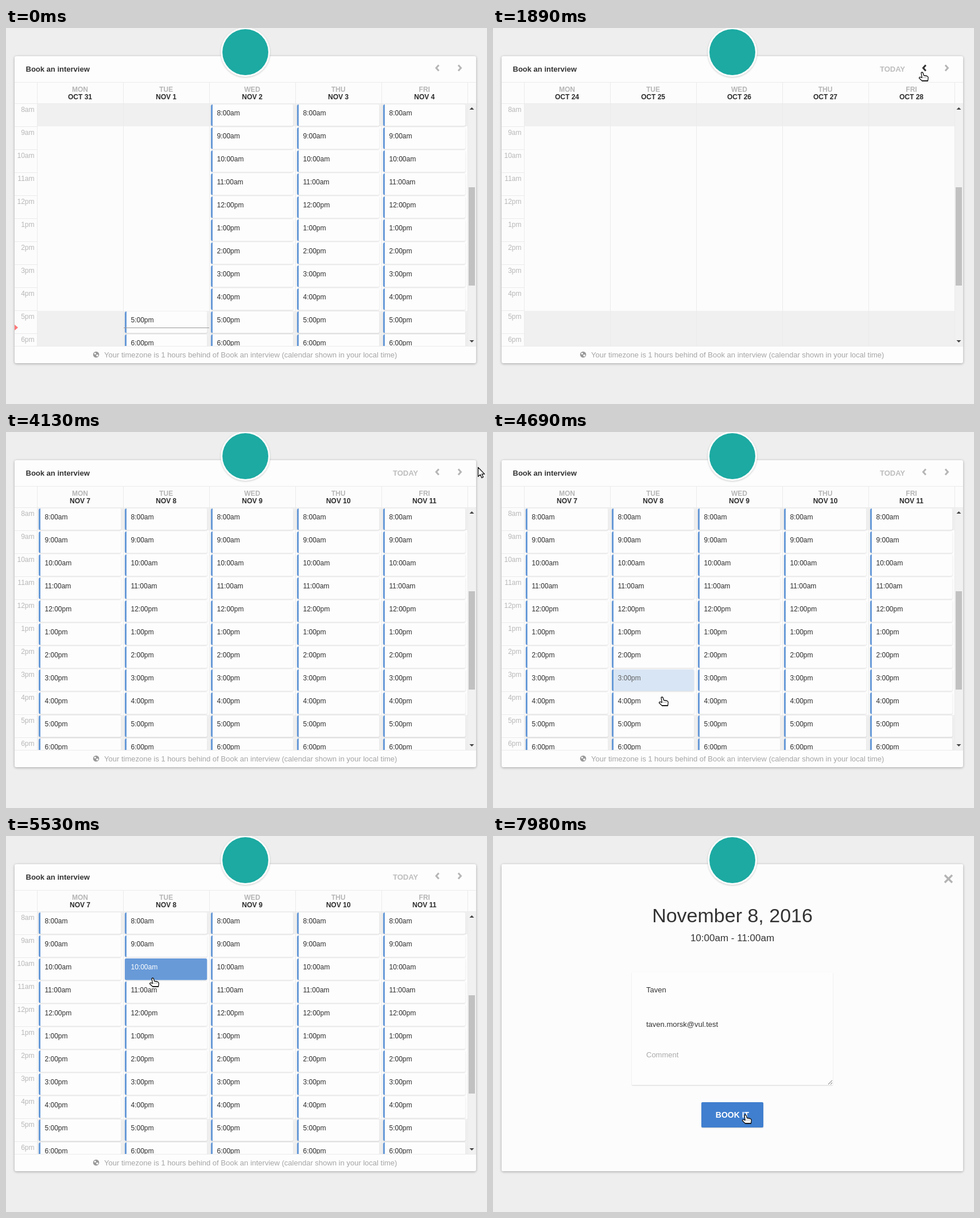
An HTML page with a canvas that plays this animation: 838x654 px, repeating every 8 s.

```html
<!DOCTYPE html>
<html lang="en">
<head>
<meta charset="utf-8">
<title>Book an interview</title>
<style>
  html, body { margin: 0; width: 100%; height: 100%; overflow: hidden; background: #eee; }
  canvas { display: block; }
</style>
</head>
<body>
<canvas id="stage" width="838" height="654"></canvas>
<script>
const ctx = document.getElementById('stage').getContext('2d');
const LOOP = 8000, STEP = 70;
const BACK_CLICK = 1890, NEXT_CLICK = 2870, SECOND_NEXT_CLICK = 3920, SLOT_CLICK = 5880;
const BLUE = '#689ad8', LINE = '#ebebeb', DARK = '#333', PALE = '#b5b5b5', PAPER = '#fcfcfc';
const DAYS = ['MON', 'TUE', 'WED', 'THU', 'FRI'];
const COLUMN = 150, ROW = 40, ROWS = 11, SLOT_WIDTH = 143.5;
const GUEST = { name: 'Taven', mail: 'taven.morsk@vul.test' };

const PREV = [736, 60, 21, 30], NEXT = [776, 60, 26, 30];
const FORM = [242, 237, 350, 196], BUTTON = [363, 463, 108, 44];

const ARROW = new Path2D('M0 0V16L3.8 12.6L6.4 18.2L9 17L6.5 11.6H11.3Z');
const HAND = new Path2D('M-1.5 1.5Q0 -.5 1.6 1.5L3 6L8.5 7Q11 8 10.6 11L10 15.5H0L-5 10.8Q-5.4 8.4 -2.6 9L-.2 10Z');

// Each pointer move swings along a curve bent towards `via`
const ENTRY = { start: 420, at: [620, 487] };
const MOVES = [
  { start: 420, end: 840, via: [860, 420], to: [827, 146] },
  { start: 840, end: 1190, via: [800, 70], to: [745, 70] },
  { start: 1190, end: 1470, via: [743, 84], to: [747, 76] },
  { start: 1960, end: 2590, via: [752, 66], to: [787, 69] },
  { start: 3920, end: 4690, via: [960, 0], to: [294, 460] },
  { start: 4690, end: 5250, via: [735, 560], to: [270, 232] },
  { start: 5250, end: 5530, via: [262, 236], to: [255, 246] },
  { start: 5530, end: 5670, via: [256, 236], to: [258, 228] },
  { start: 6440, end: 7070, via: [180, 480], to: [484, 470] },
  { start: 7140, end: 7630, via: [440, 364], to: [431, 490] },
  { start: 7910, end: 7980, via: [435, 487], to: [439, 484] }
];

const clamp = k => Math.min(1, Math.max(0, k));
const smooth = k => k * k * (3 - 2 * k);

function pointerAt(t) {
  if (t < ENTRY.start) return null;
  let at = ENTRY.at;
  for (const { start, end, via, to } of MOVES) {
    if (t < start) break;
    const k = smooth(clamp((t - start) / (end - start))), j = 1 - k;
    at = at.map((from, i) => j * j * from + 2 * j * k * via[i] + k * k * to[i]);
  }
  return at.map(Math.round);
}

const inside = (p, [x, y, w, h]) => p && p[0] >= x && p[0] < x + w && p[1] >= y && p[1] < y + h;
const hasSlot = (week, day, row) => week === 2 || week === 1 && (day > 1 || day === 1 && row > 8);

function weekAt(t) {
  if (t < BACK_CLICK) return 1;
  if (t < NEXT_CLICK) return 0;
  return t < SECOND_NEXT_CLICK ? 1 : 2;
}

function slotAt(t) {
  const p = pointerAt(t);
  if (t >= SLOT_CLICK || !inside(p, [57, 133, 744, 420])) return -1;
  const day = Math.floor((p[0] - 57) / COLUMN), row = Math.floor((p[1] - 132) / ROW);
  const onSlot = (p[0] - 57) % COLUMN < SLOT_WIDTH && hasSlot(weekAt(t), day, row);
  return onSlot ? day * ROWS + row : -1;
}

// The highlight trails the pointer by one step and builds up over four
function hoverAt(t) {
  const slot = slotAt(t - STEP);
  let steps = 0;
  while (steps < 4 && slotAt(t - STEP * (steps + 1)) === slot) steps++;
  return { slot: t >= SLOT_CLICK ? -1 : slot, heat: steps / 4 };
}

function rect(x, y, w, h, color) {
  ctx.fillStyle = color;
  ctx.fillRect(x, y, w, h);
}

function box([x, y, w, h], r, color, shadow = 0, blur = 2) {
  ctx.save();
  ctx.shadowColor = `rgba(0,0,0,${shadow})`;
  ctx.shadowBlur = blur;
  ctx.shadowOffsetY = 1;
  ctx.fillStyle = color;
  ctx.beginPath();
  ctx.roundRect(x, y, w, h, r);
  ctx.fill();
  ctx.restore();
}

function text(str, x, y, size, color, align = 'left', weight = 'normal') {
  ctx.font = `${weight} ${size}px "Liberation Sans", Arial, sans-serif`;
  ctx.textAlign = align;
  ctx.fillStyle = color;
  ctx.fillText(str, x, y);
}

function stroke(color, width, ...points) {
  ctx.strokeStyle = color;
  ctx.lineWidth = width;
  ctx.beginPath();
  points.forEach(point => ctx.lineTo(...point));
  ctx.stroke();
}

function triangle(x, y, dx, dy, color) {
  ctx.fillStyle = color;
  ctx.beginPath();
  ctx.moveTo(x + dx, y + dy);
  ctx.lineTo(x + (dx ? 0 : 4), y + (dx ? 5 : 0));
  ctx.lineTo(x - (dx ? 0 : 4), y - (dx ? 5 : 0));
  ctx.fill();
}

function disc(x, y, r, color) {
  ctx.fillStyle = color;
  ctx.beginPath();
  ctx.arc(x, y, r, 0, 7);
  ctx.fill();
}

function chevron(x, direction, active) {
  const back = x - 4.5 * direction;
  stroke(active ? DARK : PALE, 3, [back, 64.5], [x, 69.5], [back, 74.5]);
}

function hourLabel(row, minutes) {
  const hour = row + 8;
  return (hour > 12 ? hour - 12 : hour) + minutes + (hour < 12 ? 'am' : 'pm');
}

function drawSlot(day, row, heat) {
  const x = 57 + day * COLUMN, y = 133 + row * ROW;
  box([x, y, SLOT_WIDTH, 37.5], 3, '#fdfdfd', 0.14);
  ctx.save();
  ctx.beginPath();
  ctx.roundRect(x, y, SLOT_WIDTH, 37.5, 3);
  ctx.clip();
  rect(x, y, 3, 38, BLUE);
  ctx.globalAlpha = heat;
  rect(x, y, SLOT_WIDTH, 38, BLUE);
  ctx.restore();
  const shade = Math.round(45 + 210 * heat);
  text(hourLabel(row, ':00'), x + 10.5, y + 19, 12, `rgb(${shade},${shade},${shade})`);
}

function drawHeader(week, p) {
  text('Book an interview', 34.5, 76, 13, DARK, 'left', 'bold');
  if (week !== 1) text('TODAY', 696, 76, 13, '#bdbdbd', 'center', 'bold');
  chevron(749.5, -1, inside(p, PREV));
  chevron(792.5, 1, inside(p, NEXT));
  rect(15, 94, 804, 38, PAPER);
  rect(15, 94, 804, 1, LINE);
  DAYS.forEach((name, day) => {
    const date = new Date(2016, 9, 24 + 7 * week + day);
    const month = date.getMonth() === 9 ? 'OCT' : 'NOV';
    const x = 129 + day * COLUMN;
    text(name, x, 111, 12, PALE, 'center', 'bold');
    text(`${month} ${date.getDate()}`, x, 124, 12, '#2b2b2b', 'center', 'bold');
  });
}

function drawNow(t) {
  const moved = t >= NEXT_CLICK, y = moved ? 522 : 521;
  rect(205, y, 149, 1, moved ? '#f87777' : '#999');
  triangle(15, y, 6, 0, '#f77');
}

function drawScrollbar() {
  rect(805, 132, 14, 421, '#f1f1f1');
  rect(806, 277, 11, 171, '#c1c1c1');
  triangle(811.5, 142, 0, -4, '#444');
  triangle(811.5, 543, 0, 4, '#444');
}

function drawGrid(t, week) {
  ctx.save();
  ctx.beginPath();
  ctx.rect(15, 94, 804, 459);
  ctx.clip();
  rect(15, 132, 789, 421, PAPER);
  rect(55, 132, 749, 39, '#f0f0f0');
  rect(55, 492, 749, 61, '#f0f0f0');
  for (let i = 0; i <= DAYS.length; i++) rect(54 + i * COLUMN, 95, 1, 458, LINE);
  rect(15, 131, 804, 1, LINE);

  const hover = hoverAt(t);
  for (let row = 0; row < ROWS; row++) {
    text(hourLabel(row, ''), 49.5, 146 + row * ROW, 12, '#b8b8b8', 'right');
    rect(15, 171 + row * ROW, 39, 1, LINE);
    for (let day = 0; day < DAYS.length; day++) {
      const heat = day * ROWS + row === hover.slot ? hover.heat : 0;
      if (hasSlot(week, day, row)) drawSlot(day, row, heat);
    }
  }
  if (week === 1) drawNow(t);
  drawScrollbar();
  ctx.restore();
}

function drawFooter() {
  rect(15, 553, 804, 1, LINE);
  disc(157, 568, 5.3, '#999');
  disc(155.2, 566.3, 1.6, PAPER);
  disc(159, 569.6, 1.8, PAPER);
  text('Your timezone is 1 hours behind of Book an interview (calendar shown in your local time)',
    171, 573, 13, '#a5a5a5');
}

function drawDialog(opacity, p) {
  ctx.save();
  ctx.globalAlpha = opacity;
  box([15, 49, 804, 534], 3, PAPER);
  stroke('#b3b3b3', 3.4, [787, 68], [800, 81]);
  stroke('#b3b3b3', 3.4, [800, 68], [787, 81]);
  text('November 8, 2016', 417, 150, 34, DARK, 'center');
  text('10:00am - 11:00am', 417, 183, 17, DARK, 'center');
  box(FORM, 1, '#fdfdfd', 0.16, 2);
  text(GUEST.name, 267, 272, 13, DARK);
  text(GUEST.mail, 267, 332, 13, DARK);
  text('Comment', 267, 385, 13, '#aaa');
  for (const size of [3, 7]) stroke('#666', 1, [591 - size, 432], [591, 432 - size]);
  box(BUTTON, 2, inside(p, BUTTON) ? '#407fcf' : BLUE, 0.16, 2);
  text('BOOK IT', 417, 490, 14, '#fff', 'center', 'bold');
  ctx.restore();
}

function drawTextCursor() {
  stroke('#222', 1, [0, -8], [0, 8]);
  for (const y of [-8, 8]) stroke('#222', 1, [-3, y], [3, y]);
}

function drawPointer(t, p, dialogOpen) {
  const overLink = dialogOpen
    ? inside(p, BUTTON)
    : inside(p, PREV) || inside(p, NEXT) || slotAt(t) >= 0;
  ctx.save();
  ctx.translate(p[0] + 0.5, p[1] + 0.5);
  if (dialogOpen && inside(p, FORM)) {
    drawTextCursor();
  } else {
    const icon = overLink ? HAND : ARROW;
    ctx.fillStyle = '#fff';
    ctx.strokeStyle = '#111';
    ctx.lineWidth = 1.3;
    ctx.lineJoin = 'round';
    ctx.fill(icon);
    ctx.stroke(icon);
    if (overLink) {
      for (let i = 0; i < 3; i++) rect(1.5 + 2.5 * i, 9, 1, 1.2, '#555');
      rect(0, 14.5, 10.3, 1.5, '#111');
    }
  }
  ctx.restore();
}

function draw(time) {
  const t = Math.floor(time / STEP) * STEP;
  const week = weekAt(t), p = pointerAt(t);
  const fade = clamp((t - SLOT_CLICK + STEP) / 420);

  rect(0, 0, 838, 654, '#eee');
  box([15, 49, 804, 534], 3, '#fdfdfd', 0.32, 4);
  drawHeader(week, fade ? null : p);
  drawGrid(t, week);
  drawFooter();
  if (fade) drawDialog(1 - (1 - fade) ** 2, p);

  box([374, -1, 86, 86], 43, '#fdfdfd', 0.2, 3);
  disc(417, 42, 40, '#1caaa2');
  if (p) drawPointer(t, p, fade > 0.2);
}

function tick() {
  draw(performance.now() % LOOP);
  requestAnimationFrame(tick);
}
tick();
</script>
</body>
</html>
```
